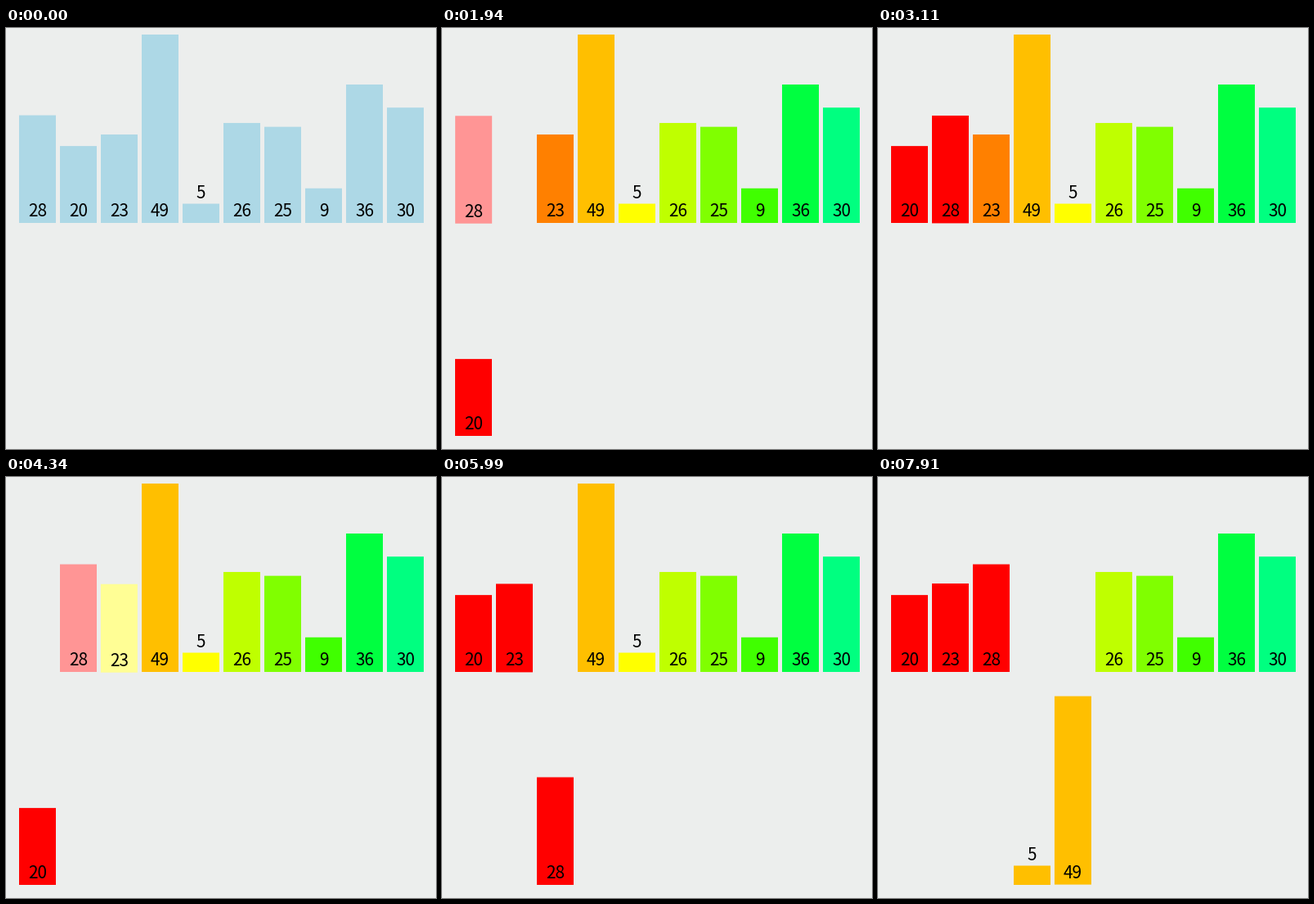
Recreate the animation shown at these times as a matplotlib script. Size 526 by 514 pixels, loop 8000 ms.

```python
import matplotlib.pyplot as plt
from matplotlib.animation import FuncAnimation
from matplotlib.colors import to_rgb
from matplotlib.patches import Rectangle

W, H, DPI = 526, 514, 100
LOOP, INTERVAL = 8000, 20            # ms
HOLD, TICK = 500, 30                 # first pause and redraw grid, ms
START, PERIOD, EASE = 478, 480, 250  # merge step timing, ms

VALUES = [28, 20, 23, 49, 5, 26, 25, 9, 36, 30]
GROUPS = ["#ff0000", "#ff4000", "#ff8000", "#ffbf00", "#ffff00",
          "#bfff00", "#80ff00", "#40ff00", "#00ff40", "#00ff80"]
LEFT, PITCH, BAR_W = 16, 50, 45
BASE, DROP, UNIT = 238, 260, 230 / 49


def pale(color):
    return tuple(min(1, c + 149 / 255) for c in color)


def build_states():
    """Bar states (x, y offset, rgb) after every step of the merge sort."""
    state = [(LEFT + PITCH * i, 0, to_rgb("lightblue")) for i in range(len(VALUES))]
    states = [state]

    def push(changes):
        nxt = list(states[-1])
        for value, bar in changes.items():
            nxt[VALUES.index(value)] = bar
        states.append(nxt)

    def bar(value):
        return states[-1][VALUES.index(value)]

    def highlight(*values):
        return {v: (*bar(v)[:2], pale(bar(v)[2])) for v in values}

    def down(value, slot, group, then=()):
        target = (LEFT + PITCH * slot, DROP, to_rgb(GROUPS[group]))
        push({value: target, **highlight(*then)})

    def up(value):
        x, _, color = bar(value)
        push({value: (x, 0, color)})

    push({v: (*bar(v)[:2], to_rgb(g)) for v, g in zip(VALUES, GROUPS)})

    push(highlight(28, 20))
    down(20, 0, 0)
    down(28, 1, 0)
    up(20)
    up(28)

    push(highlight(20, 23))
    down(20, 0, 0, then=[28])
    down(23, 1, 0)
    down(28, 2, 0)
    up(20)
    up(23)
    up(28)

    push(highlight(49, 5))
    down(5, 3, 3)
    down(49, 4, 3)
    return states


def ease(x):
    x = min(max(x, 0), 1)
    return 4 * x ** 3 if x < 0.5 else 1 - 4 * (1 - x) ** 3


def mix(a, b, k):
    return a + (b - a) * k


STATES = build_states()

fig = plt.figure(figsize=(W / DPI, H / DPI), dpi=DPI, facecolor="#eceeed")
ax = fig.add_axes([0, 0, 1, 1])
ax.set_xlim(0, W)
ax.set_ylim(H, 0)
ax.axis("off")

bars, labels = [], []
for i, value in enumerate(VALUES):
    rect = Rectangle((0, 0), BAR_W, UNIT * value, lw=0, snap=False, zorder=2 + i)
    bars.append(ax.add_patch(rect))
    labels.append(ax.text(0, 0, str(value), ha="center", va="baseline",
                          family="Noto Sans CJK JP", fontsize=20.8 * 72 / DPI,
                          color="black", zorder=2.5 + i))


def draw(frame):
    t = frame * INTERVAL + INTERVAL / 2
    if t < HOLD:
        step, k = 0, 0
    else:
        t = HOLD + (t - HOLD) // TICK * TICK
        step = min(int((t - START) // PERIOD), len(STATES) - 2)
        k = ease((t - START - step * PERIOD) / EASE)

    for value, rect, label, a, b in zip(VALUES, bars, labels,
                                        STATES[step], STATES[step + 1]):
        x, dy = mix(a[0], b[0], k), mix(a[1], b[1], k)
        top = BASE + dy - UNIT * value
        rect.set_xy((x, top))
        rect.set_facecolor([mix(p, q, k) for p, q in zip(a[2], b[2])])
        inside = UNIT * value > 30
        label.set_position((x + BAR_W / 2, BASE + dy - 8 if inside else top - 7))
    return bars + labels


anim = FuncAnimation(fig, draw, frames=LOOP // INTERVAL, interval=INTERVAL,
                     repeat=True, repeat_delay=0, blit=False)
plt.show()
```
